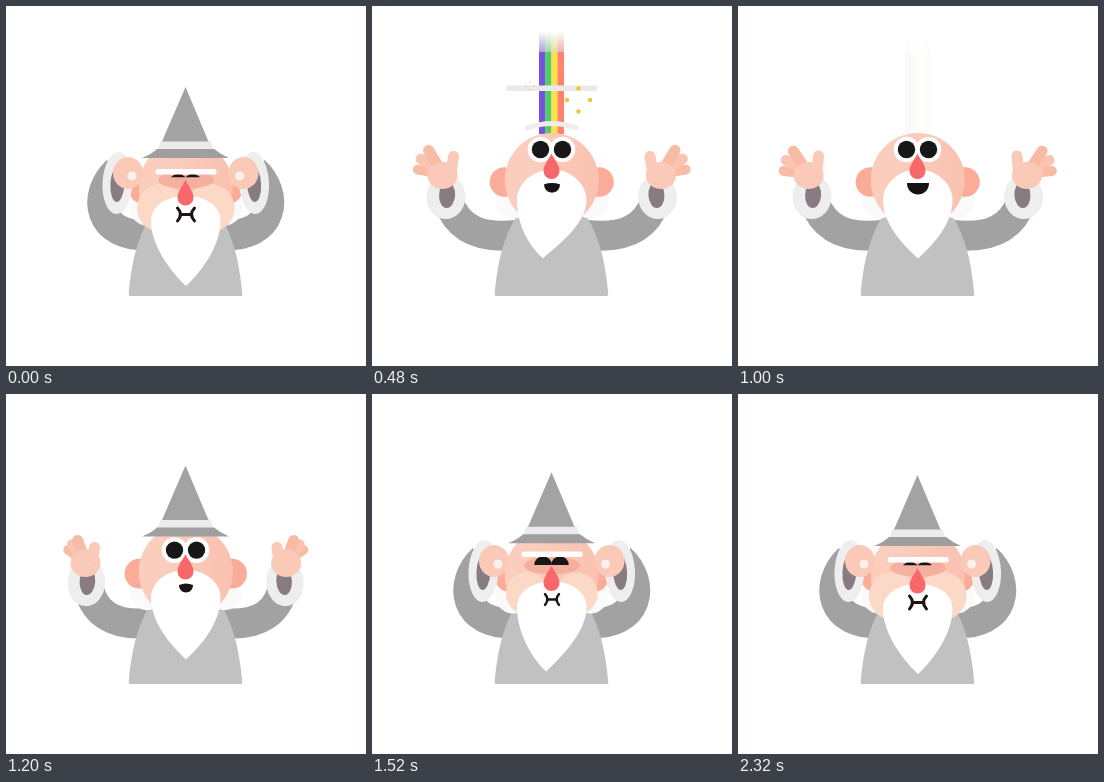
Recreate the animation shown at these times as an HTML page. Size 360 px wide and 360 px high, loop 2360 ms.

```html
<!DOCTYPE html>
<html lang="en">
<head>
<meta charset="utf-8">
<title>Wizard</title>
<style>
html, body { margin: 0; width: 100%; height: 100%; overflow: hidden; background: #fff; }
svg { display: block; width: 100vw; height: 100vh; }
</style>
</head>
<body>
<svg viewBox="0 0 360 360">
  <defs>
    <linearGradient id="fade" gradientUnits="userSpaceOnUse" x1="0" y1="25" x2="0" y2="47">
      <stop offset="0" stop-color="#000"/><stop offset="1" stop-color="#fff"/>
    </linearGradient>
    <mask id="sky" maskUnits="userSpaceOnUse" x="0" y="0" width="360" height="360">
      <rect width="360" height="360" fill="url(#fade)"/>
    </mask>
    <linearGradient id="skin">
      <stop offset="0.3" stop-color="#fbcdbd"/><stop offset="1" stop-color="#fac1af"/>
    </linearGradient>
  </defs>
  <g id="scene"></g>
</svg>
<script>
const LOOP = 2360, STEP = 40, MID = 179.75;
const scene = document.getElementById('scene');

// Progress of t from a to b: linear, eased at both ends, eased at the end.
const ramp = (t, a, b) => Math.min(1, Math.max(0, (t - a) / (b - a)));
const smooth = (t, a, b) => { const u = ramp(t, a, b); return u * u * (3 - 2 * u); };
const out = (t, a, b) => 1 - (1 - ramp(t, a, b)) ** 2;
const mix = (a, b, u) => a + (b - a) * u;

const n = v => +v.toFixed(2);
const oval = (x, y, rx, ry, fill, extra = '') =>
  `<ellipse cx="${n(x)}" cy="${n(y)}" rx="${n(rx)}" ry="${n(ry)}" fill="${fill}" ${extra}/>`;
const disc = (x, y, r, fill, extra) => oval(x, y, r, r, fill, extra);
const box = (x, y, w, h, fill, extra = '') =>
  `<rect x="${n(x)}" y="${n(y)}" width="${n(Math.max(0, w))}" height="${n(Math.max(0, h))}" fill="${fill}" ${extra}/>`;
const shape = (d, fill, extra = '') => `<path d="${d}" fill="${fill}" ${extra}/>`;
const line = (d, color, w, extra = '') =>
  shape(d, 'none', `stroke="${color}" stroke-width="${n(w)}" stroke-linecap="round" ${extra}`);
const both = s => s + `<g transform="translate(${2 * MID} 0) scale(-1 1)">${s}</g>`;

// Everything that moves follows these few drivers.
function drivers(t) {
  const open = out(t, 40, 257) - out(t, 1110, 1400);
  const strain = 1 - ramp(t, 40, 120) + smooth(t, 1520, 2200);
  const hatLift = t < 600
    ? -180 * ramp(t, 40, 160) ** 1.2
    : -39.5 * Math.exp((1120 - t) / 45) - 2.7 * (1 - strain);
  return {
    t, open, strain, hatLift,
    reach: out(t, 40, 207) - smooth(t, 1110, 1450),
    spread: ramp(t, 160, 400) - ramp(t, 1100, 1200),
    squint: 1 - ramp(t, 40, 120) + smooth(t, 1280, 1480),
    cheer: smooth(t, 100, 760) - smooth(t, 1080, 1320),
    dy: -24 * open - 2.5 * (1 - strain)
  };
}

function sleeve({ reach }) {
  const p = (x, y, x2, y2) => `${n(mix(x, x2, reach))} ${n(mix(y, y2, reach))}`;
  return shape(`M145 229C${p(90, 233, 108, 233)} ${p(86, 188, 86, 223)} ${p(111, 165, 76, 195)}`,
    'none', 'stroke="#a2a2a2" stroke-width="30"');
}

function hand({ t, reach, spread }) {
  const to = (held, wide) => mix(held, wide, reach);
  const x = to(111.5, 74), y = to(177, 191);
  const wave = 4 * spread * Math.sin((t - 480) / 280 * 2 * Math.PI);
  let fingers = '';
  for (let i = 2; i >= 0; i--) {
    const a = -(110 + 11 * spread + (18 + 7 * spread) * i) * Math.PI / 180;
    const r = (27 - i) * reach;
    fingers += line(`M0 0L${n(r * Math.cos(a))} ${n(r * Math.sin(a))}`, i % 2 ? '#fac4b0' : '#f8bba6', 11 - i / 2);
  }
  return `<g transform="rotate(3 ${n(x)} ${n(y)})">`
    + oval(x, y, to(15, 19.5), to(31, 22), '#eeeeee')
    + oval(x + to(0, 1), y + to(1, -2), to(7, 8), to(18, 13), '#877c81') + '</g>'
    + `<g transform="translate(${n(to(122, 70.5))} ${n(to(167, 167.5))}) rotate(${n(wave)})">`
    + fingers
    + oval(0, 2 * reach, to(15, 15), to(16, 13.5), '#fac9b7')
    + line(`M${n(8 * reach)} ${n(2 * reach)}L${n(11 * reach)} ${n(-17 * reach)}`, '#fac9b7', 11)
    + disc(4, 3, 4.5 * (1 - reach), '#fdf1ed') + '</g>';
}

function rainbow({ t, hatLift }) {
  const alpha = t < 80 ? 0 : ramp(.8 - (t - 480) / 667, 0, 1);
  if (alpha <= 0) return '';
  const top = t < 600 ? Math.max(24, 146 + hatLift) : 24;
  const bars = ['#5428d8', '#25c043', '#ffd91f', '#ff6348']
    .map((c, i) => box(167 + i * 6.2, top, 6.4, 128 - top, c)).join('');
  return `<g mask="url(#sky)" opacity="${n(alpha)}">${bars}`
    + box(167, top, 25, 46 - top, '#cccccc', 'opacity=".55"') + '</g>';
}

// A smoke ring that widens and parts, and a ripple above the head.
function puffs({ t }) {
  const alpha = ramp(t, 100, 200) - ramp(t, 760, 940);
  if (alpha <= 0) return '';
  const reach = 50 * (1 - Math.exp((120 - Math.max(t, 130)) / 146));
  const gap = 22 * Math.max(0, t - 520) / 240;
  const late = ramp(t, 160, 700), w = 22 + 4 * late, y = 129 - 7 * out(t, 160, 480);
  return `<g opacity="${n(alpha)}">`
    + both(box(MID + gap, 79.5, reach - gap, 5.5, '#eaeaea', 'rx="2.7"'))
    + (gap ? '' : box(MID - 4, 79.5, 8, 5.5, '#eaeaea'))
    + line(`M${n(MID - w)} ${n(y)}Q${MID} ${n(y - 9)} ${n(MID + w)} ${n(y)}`, '#ededed', 6.5 - 2.5 * late)
    + '</g>';
}

// A sparkle swells, shrinks and breaks into four drifting dots.
function sparkle(x, y, start, size, t) {
  const age = t - start;
  if (age <= 0 || age >= 480) return '';
  const r = age < 220 ? size * Math.sin(Math.PI * age / 220) : 0;
  const q = n(r * .16), R = n(r);
  let s = r < .2 ? '' : shape(
    `M0 ${-R}Q${q} ${-q} ${R} 0Q${q} ${q} 0 ${R}Q${-q} ${q} ${-R} 0Q${-q} ${-q} 0 ${-R}Z`,
    '#f6cf1d', 'stroke="#f6cf1d" stroke-width="1.4" stroke-linejoin="round"');
  if (age > 180) {
    const d = size * 1.05 * out(age, 150, 400), dot = size * .2 * (1 - ramp(age, 420, 480));
    for (let a = 0; a < 4; a++) s += disc(d * Math.cos(a * Math.PI / 2), d * Math.sin(a * Math.PI / 2), dot, '#f2c52e');
  }
  return `<g transform="translate(${x} ${y})">${s}</g>`;
}

function hat({ hatLift }) {
  if (hatLift < -150) return '';
  return `<g mask="url(#sky)"><g transform="translate(0 ${n(hatLift)})">`
    + shape('M154.5 135H204.5L207.5 144H151.5Z', '#ebebeb')
    + shape('M179.5 81L202.500 135.5H156Z', '#a3a3a3')
    + shape('M151 143H208Q214 148 223 152H136Q146 148 151 143Z', '#9f9f9f')
    + '</g></g>';
}

// Pupils sink behind a flat lower lid while squinting.
function eyes({ squint, strain, dy }) {
  const y = 170 + dy, gap = 11 - 2.5 * squint - 1.2 * strain;
  const lid = y + 14 - 10.5 * squint - 2.3 * strain;
  const pair = (cy, r, fill, extra) =>
    disc(179.5 - gap, cy, r, fill, extra) + disc(179.5 + gap, cy, r, fill, extra);
  return oval(180, y + 4, 28, 9, '#f4a999', `opacity="${n(.8 * squint)}"`)
    + `<clipPath id="lid">${box(140, y - 20, 80, lid - y + 20, '#000')}</clipPath>`
    + `<g clip-path="url(#lid)">${pair(y, 12.8, '#fff', `opacity="${n(1 - squint)}"`)}`
    + pair(y + 3.5 * squint + 3 * strain, 8.7, '#171717') + '</g>'
    + box(149.5, y - 10 + 3 * strain, 61, 5.4, '#fff', `rx="2" opacity="${n(squint)}"`);
}

function beard({ t, open, strain, dy }) {
  const tipX = 180 - 9 * (ramp(t, 40, 160) - smooth(t, 480, 1000))
    - 6 * smooth(t, 1300, 1500) * (1 - strain);
  const tipY = 280 - 25 * open - 2.5 * (1 - strain);
  const top = n(190 + dy), wide = 215 + dy * .8;
  return shape(`M180 ${top}C160 ${top} 145 ${n(wide - 15)} 145 ${n(wide)}`
    + `C145 ${n(wide + 25)} ${n(tipX - 15)} ${n(tipY - 14)} ${n(tipX)} ${n(tipY)}`
    + `C${n(tipX + 15)} ${n(tipY - 14)} 214.5 ${n(wide + 25)} 214.5 ${n(wide)}`
    + `C214.5 ${n(wide - 15)} 200 ${top} 180 ${top}Z`, '#fff');
}

function mouth({ t, cheer, strain, dy }) {
  if (t < 80 || t >= 1320) {
    return `<g transform="translate(180 ${n(208.500 + dy * 1.2)}) scale(${n(.82 + .18 * strain)})">`
      + line('M-8.5 -6.5Q-2.5 0 -8.5 6.5M8.5 -6.5Q2.5 0 8.5 6.5M-5 0H5', '#1b1414', 3) + '</g>';
  }
  const w = n(3 + 8 * cheer), h = n((3.5 + 8 * cheer) * 1.33);
  return shape(`M${-w} 0Q0 ${n(-6 * (1 - cheer))} ${w} 0C${w} ${h} ${-w} ${h} ${-w} 0Z`, '#171313',
    `transform="translate(180 ${n(203.5 + dy + 3 * (1 - cheer))})"`);
}

function face(d) {
  const { t, squint, strain, dy } = d;
  const puff = squint * (.88 + .12 * strain);
  const long = 1 + .13 * (ramp(t, 40, 160) - ramp(t, 160, 360));
  return both(disc(155, 202 + dy, 24 * puff, '#fcd8c7', `opacity="${n(Math.min(1, puff * 1.2))}"`))
    + eyes(d) + beard(d)
    + shape('M0 0C2 5 8 11 8 17.5A8 8 0 0 1 -8 17.5C-8 11 -2 5 0 0Z', '#f8686a',
      `transform="translate(179.500 ${n(174 + dy)}) scale(1 ${n(long)})"`)
    + mouth(d);
}

function draw(t) {
  const d = drivers(t), headY = 181 - 7 * d.open;
  const ear = 132.5 + 5 * (1 - d.reach);
  scene.innerHTML = rainbow(d)
    + both(sleeve(d))
    + shape('M124 290Q122.5 290 122.8 287C126 254 131 237 140 218Q152 194 179.5 190'
      + 'Q207 194 219 218C228 237 233 254 236.2 287Q236.5 290 235 290Z', '#c1c1c1')
    + both(disc(141, headY + 21, 17.5, '#fafafa') + disc(ear, headY + 2, 14.8, '#fbac98'))
    + disc(MID, headY, 47, 'url(#skin)')
    + face(d) + puffs(d) + hat(d)
    + both(hand(d))
    + sparkle(206.500, 94, 60, 11, t)
    + sparkle(158, 80, 100, 3.5, t)
    + sparkle(188, 61, 110, 3, t);
}

function frame(now) {
  draw(Math.floor(now % LOOP / STEP) * STEP);
  requestAnimationFrame(frame);
}
draw(0);
requestAnimationFrame(frame);
</script>
</body>
</html>
```
